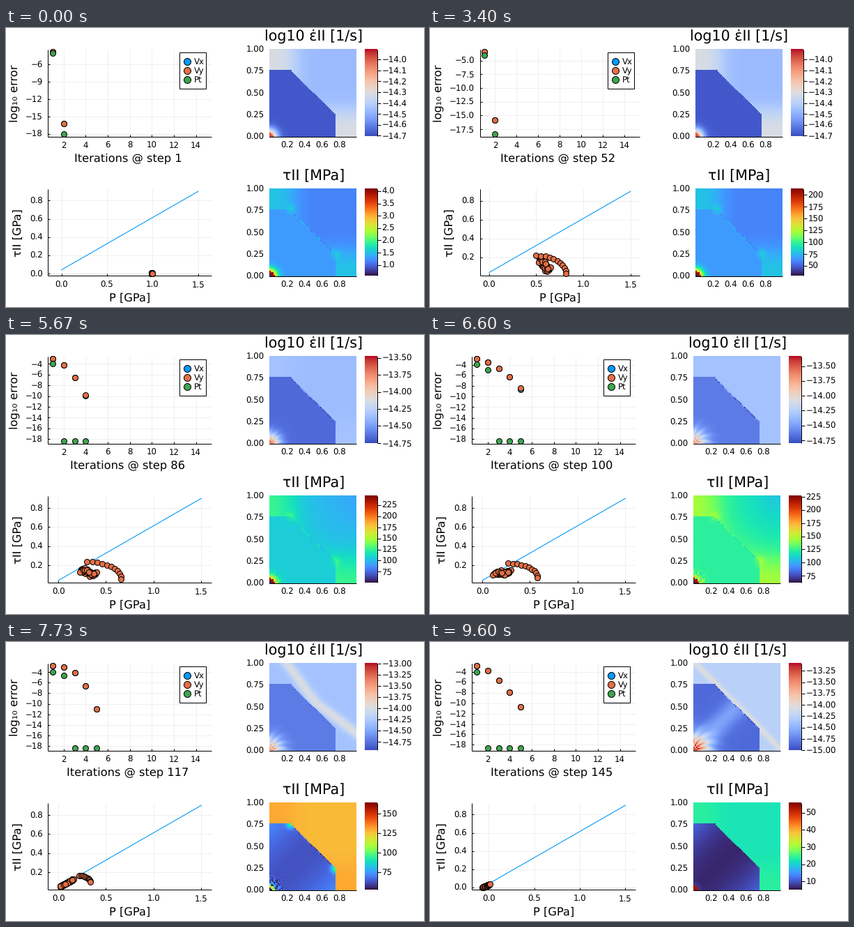
A matplotlib script that plays this animation: 600 by 400 pixels, repeating every 9.67 s.

```python
import numpy as np
import matplotlib.pyplot as plt
from matplotlib.animation import FuncAnimation
from matplotlib.collections import LineCollection
from matplotlib.patches import Rectangle

plt.rcParams["font.family"] = "DejaVu Sans"
plt.rcParams["text.hinting"] = "no_hinting"

STEPS = 145
FRAMES = STEPS + 1  # the last step is held a little longer
LOOP_MS = 9670
PX = 0.72  # points per pixel at 100 dpi
TICK, GUIDE, TITLE = 11.8 * PX, 16.25 * PX, 20.65 * PX
BLUE, ORANGE, GREEN = "#009AFA", "#E36F47", "#3EA44E"
PHASES = [0, 52, 72, 100, 117, 145]

fig = plt.figure(figsize=(6, 4), dpi=100, facecolor="white")
ax = fig.add_axes([0, 0, 1, 1])
ax.set(xlim=(0, 600), ylim=(400, 0))
ax.autoscale(False)
ax.axis("off")

shown = []
black, grid = [], []


def stages(s):
    """Progress of yielding, softening, failure and unloading, each 0 to 1."""
    return [np.clip((s - a) / (b - a), 0, 1) for a, b in zip(PHASES[1:], PHASES[2:])]


# ---------- drawing helpers ----------

def keep(artist):
    shown.append(artist)
    return artist


def put(x, y, s, size=TICK, ha="center", **kw):
    keep(ax.text(x, y, s, fontsize=size, ha=ha, va="baseline", zorder=5, **kw))


def put_up(x, y, s):
    put(x, y, s, GUIDE, rotation=90, rotation_mode="anchor")


def dots(x, y, color, size=8, z=4):
    keep(ax.plot(x, y, "o", ms=size * PX, mfc=color, mec="black",
                 mew=PX, zorder=z)[0])


def ticks(lo, hi, step):
    first, last = np.ceil(lo / step - 1e-9), np.floor(hi / step + 1e-9)
    return np.arange(first, last + 1) * step


def label(v, digits):
    return f"{round(v, 6) + 0:.{digits}f}".replace("-", "\u2212")


def frame(box, xlim, ylim, xt, yt, xd, yd):
    """Left and bottom axis with inward ticks, grid and labels."""
    x0, x1, y0, y1 = box
    fx = lambda v: x0 + (np.asarray(v) - xlim[0]) / (xlim[1] - xlim[0]) * (x1 - x0)
    fy = lambda v: y1 - (np.asarray(v) - ylim[0]) / (ylim[1] - ylim[0]) * (y1 - y0)
    black.extend([[(x0, y0), (x0, y1)], [(x0, y1), (x1, y1)]])
    for v in xt:
        x = fx(v)
        grid.append([(x, y0), (x, y1)])
        black.append([(x, y1), (x, y1 - 3)])
        put(x, 171.5 if y1 < 200 else 371.5, label(v, xd))
    for v in yt:
        y = fy(v)
        grid.append([(x0, y), (x1, y)])
        black.append([(x0, y), (x0 + 3, y)])
        put(x0 - 7.5, y + 4.4, label(v, yd), ha="right")
    return fx, fy


def picture(data, extent, cmap):
    keep(ax.imshow(data, extent=extent, cmap=cmap, vmin=0, vmax=1, origin="lower",
                   aspect="auto", interpolation="nearest", zorder=3))


def heatmap(data, cmap, x0, y0, cx, lo, hi, step, digits):
    x1, y1 = x0 + 124.7, y0 + 125.2
    frame((x0, x1, y0, y1), (0, 0.993), (0, 1),
          [0.2, 0.4, 0.6, 0.8], [0, 0.25, 0.5, 0.75, 1], 1, 2)
    picture(data, (x0, x1, y1, y0), cmap)
    picture(np.linspace(0, 1, 256)[:, None], (cx, cx + 17.5, y1 - 0.5, y0), cmap)
    edge = cx + 18
    black.append([(edge, y0), (edge, y1 - 0.5)])
    for v in ticks(lo, hi, step):
        y = y1 - 0.5 - (v - lo) / (hi - lo) * 125
        black.append([(edge, y), (edge + 5, y)])
        put(edge + 6.5, y + 4.4, label(v, digits), ha="left")


# ---------- fields, as fractions of the colour range ----------

N = 62
axis = (np.arange(N) + 0.5) / N
X, Y = np.meshgrid(axis, axis)
R, ANGLE, ACROSS = np.hypot(X, Y), np.arctan2(Y, X), abs(X - Y)
INSIDE = (X < 0.755) & (Y < 0.755) & (X + Y < 1.005)
EDGE = (abs(X + Y - 1) < 0.012) & (ACROSS < 0.5)
ENDS = np.exp(-(np.minimum(X, Y) / 0.32) ** 3)
FAR = np.hypot(1 - X, 1 - Y)
TIPS = np.exp(-((ACROSS - 0.51) ** 2 + (X + Y - 1.01) ** 2) / 0.005)
NOISE = np.random.default_rng(4).random((N, N)) - 0.5


def bump(d, width):
    return np.exp(-(d / width) ** 2)


def strain_field(s):
    onset, soft, fail, drop = stages(s)
    bend = 1.02 + (1 - drop) * (0.06 + 0.15 * ACROSS)
    outer = (0.29 - 0.02 * onset + 0.05 * soft + 0.06 * drop
             + 0.19 * (1 - 0.75 * onset - 0.25 * soft) * ENDS
             + (0.17 * fail - 0.05 * drop) * bump(X + Y - bend, 0.08 - 0.03 * drop))
    streak = 1 + 0.3 * soft * np.sin(15 * ANGLE + 30 * R)
    hot = (0.85 - 0.25 * soft + 0.08 * drop) * bump(R, 0.09 + 0.06 * soft + 0.04 * drop)
    inner = (0.03 + 0.08 * soft - 0.04 * drop
             + 0.14 * drop * bump(ACROSS, 0.17) + hot * streak)
    inner[R < 0.045] = 0.9 - 0.2 * soft + 0.2 * drop
    field = np.where(INSIDE, inner, outer)
    field += EDGE * NOISE * (0.08 + 0.3 * soft * (1 - fail) + 0.3 * drop)
    return np.clip(field, 0, 1)


def stress_field(s):
    onset, soft, fail, drop = stages(s)
    outer = (0.165 + 0.1 * soft + 0.4 * fail - 0.33 * drop
             + (0.1 - 0.03 * soft - 0.04 * fail) * ENDS
             + 0.17 * soft * (1 - fail) * FAR)
    inner = (0.2 + 0.17 * soft - 0.28 * fail - 0.06 * drop
             + 0.15 * fail * ACROSS ** 2
             + (0.75 - 0.4 * soft - 0.25 * drop) * bump(R, 0.085 - 0.025 * fail)
             + 0.6 * soft * (1 - drop) * NOISE * bump(R, 0.11))
    inner[R < 0.06] = 0.95 - 0.4 * fail * (1 - drop)
    inner[R < 0.032] = 0.02 + 0.93 * drop
    field = np.where(INSIDE, inner, outer)
    field += TIPS * (0.06 * (1 - fail) + 0.28 * fail * (1 - drop) * INSIDE)
    field += EDGE * NOISE * (0.15 - 0.1 * drop)
    return np.clip(field, 0, 1)


def strain_range(s):
    onset, soft, fail, drop = stages(s)
    return (-14.705 - 0.095 * soft - 0.14 * fail - 0.06 * drop,
            -13.904 + 0.284 * onset + 0.29 * soft + 0.345 * fail - 0.095 * drop)


def stress_range(s):
    onset, soft, fail, drop = stages(s)
    load = min(s, PHASES[1])
    return (0.555 * load + 10 * onset + 22.6 * soft - 9.2 * fail - 47.2 * drop,
            4.105 * load + 52 * onset - 38 * soft - 63 * fail - 108.5 * drop)


# ---------- pressure and stress cloud ----------

# at the end of each phase: arc origin and size, then core start and end
POSES = np.array([
    [1, 0, 0, 0, 1, 0, 1, 0],
    [0.50, 0.03, 0.315, 0.19, 0.55, 0.17, 0.625, 0.06],
    [0.33, 0.043, 0.41, 0.21, 0.37, 0.18, 0.48, 0.075],
    [0.27, 0.07, 0.31, 0.15, 0.13, 0.12, 0.28, 0.13],
    [0.22, 0.095, 0.115, 0.07, 0.02, 0.05, 0.16, 0.128],
    [-0.06, 0.04, 0.07, -0.03, -0.065, 0.003, 0, 0.03],
])
rng = np.random.default_rng(11)
ALONG = rng.random(80)
JITTER = rng.normal(size=(2, 80))
ARC = np.pi / 2 * np.linspace(0, 1, 11)


def cloud(s):
    x, y, w, h, p0, t0, p1, t1 = [np.interp(s, PHASES, c) for c in POSES.T]
    spread = 0.013 * min(s / 52, 1) * (1 - 0.75 * stages(s)[2])
    p = p0 + (p1 - p0) * ALONG + spread * JITTER[0]
    t = t0 + (t1 - t0) * ALONG + spread * JITTER[1]
    t = np.clip(t, 0, np.maximum(0.04 + 0.573 * p, 0))
    return np.r_[p, x + w * np.sin(ARC)], np.r_[t, y + h * np.cos(ARC)]


# ---------- solver residuals ----------

def residuals(s):
    onset, soft, fail, drop = stages(s)
    first_step = s == 1
    count = 2 if s < 62 else 3 if s < 80 else 4 if s < 90 else 5
    progress = np.linspace(0, 1, count)
    start = -3.4 + 0.2 * onset + 0.32 * soft + 0.08 * fail - 0.38 * first_step
    fall = 12.4 if count == 2 else 8 - 2.5 * soft + 2.7 * fail - 0.3 * drop
    vy = start - fall * progress ** (1.6 + fail - 1.1 * drop)
    vx = vy - 0.3 * soft * (1 - fail) * (progress == 1)
    pt = np.full(count, -18.4 + 0.35 * first_step - 0.25 * drop)
    pt[0] = -3.97
    if 90 <= s < 128:
        pt[1] = -5 + 0.4 * fail
    return vx, vy, pt


def error_step(s):
    if s == 1:
        return 3
    return 2.5 if s < 83 else 2


# ---------- panels ----------

def error_panel(s, x0, x1):
    vx, vy, pt = residuals(s)
    values = np.r_[vx, vy, pt]
    lo, hi = values.min(), values.max()
    pad = 0.03 * (hi - lo)
    gap = error_step(s)
    fx, fy = frame((x0, x1, 30.5, 155.7), (0.58, 15.42), (lo - pad, hi + pad),
                   range(2, 15, 2), ticks(lo - pad, hi + pad, gap), 0, int(gap == 2.5))
    its = np.arange(1, len(vy) + 1)
    for v, color in [(vx, BLUE), (vy, ORANGE), (pt, GREEN)]:
        dots(fx(its), fy(v), color)
    put((x0 + x1) / 2 - 2.7, 192, f"Iterations @ step {s}", GUIDE)
    put_up(17, 93.5, "log\u2081\u2080 error")
    left = x1 - 46
    keep(ax.add_patch(Rectangle((left, 35), 38, 52, fc="white", ec="black",
                                lw=PX, zorder=4)))
    for name, color, y in [("Vx", BLUE, 47.8), ("Vy", ORANGE, 61), ("Pt", GREEN, 74)]:
        dots([left + 10.5], [y], color, 10, 5)
        put(left + 20.5, y + 4.4, name, ha="left")


def cloud_panel(s, x0, x1):
    p, t = cloud(s)
    y0, y1 = 230.8, 355.4
    lo, left = min(0.04, t.min()), min(0, p.min())
    pad = 0.03 * (0.9 - lo)
    ylim = (lo - pad, 0.9 + pad)
    half = (x1 - x0) / (y1 - y0) * (ylim[1] - ylim[0]) / 2
    mid = (left + 1.5) / 2
    xlim = (mid - half, mid + half)
    fx, fy = frame((x0, x1, y0, y1), xlim, ylim,
                   ticks(*xlim, 0.5), ticks(*ylim, 0.2), 1, 1)
    keep(ax.plot(fx([0, 1.5]), fy([0.04, 0.9]), color=BLUE, lw=1.1 * PX, zorder=3)[0])
    dots(fx(p), fy(t), ORANGE)
    put((x0 + x1) / 2, 392, "P [GPa]", GUIDE)
    put_up(x0 - 38.4, 293.3, "\u03c4II [GPa]")


def draw(i):
    s = min(i + 1, STEPS)
    while shown:
        shown.pop().remove()
    black.clear()
    grid.clear()
    # wider tick labels push every panel to the right
    wide = error_step(s) == 2.5
    x0, x1, hx, cx = (71.5, 301, 381, 518) if wide else (60.3, 295, 378.3, 515)

    error_panel(s, x0, x1)
    cloud_panel(s, x0, x1)

    lo, hi = strain_range(s)
    gap, digits = (0.1, 1) if hi - lo < 1 else (0.25, 2)
    heatmap(strain_field(s), "coolwarm", hx, 30.5, cx, lo, hi, gap, digits)
    lo, hi = stress_range(s)
    gap = next(g for g in (0.5, 1, 2, 5, 10, 25, 50) if (hi - lo) / g <= 9.2)
    heatmap(stress_field(s), "turbo", hx, 230.5, cx, lo, hi, gap, int(gap < 1))

    put(hx + 63, 18.5, "log10 \u03b5\u0307II [1/s]", TITLE)
    put(hx + 63, 218.5, "\u03c4II [MPa]", TITLE)
    keep(ax.add_collection(LineCollection(grid, colors="#efefef", lw=PX, zorder=1)))
    keep(ax.add_collection(LineCollection(black, colors="black", lw=PX, zorder=2)))
    return shown


anim = FuncAnimation(fig, draw, frames=FRAMES, interval=LOOP_MS / FRAMES,
                     repeat=True, repeat_delay=0)
plt.show()
```
